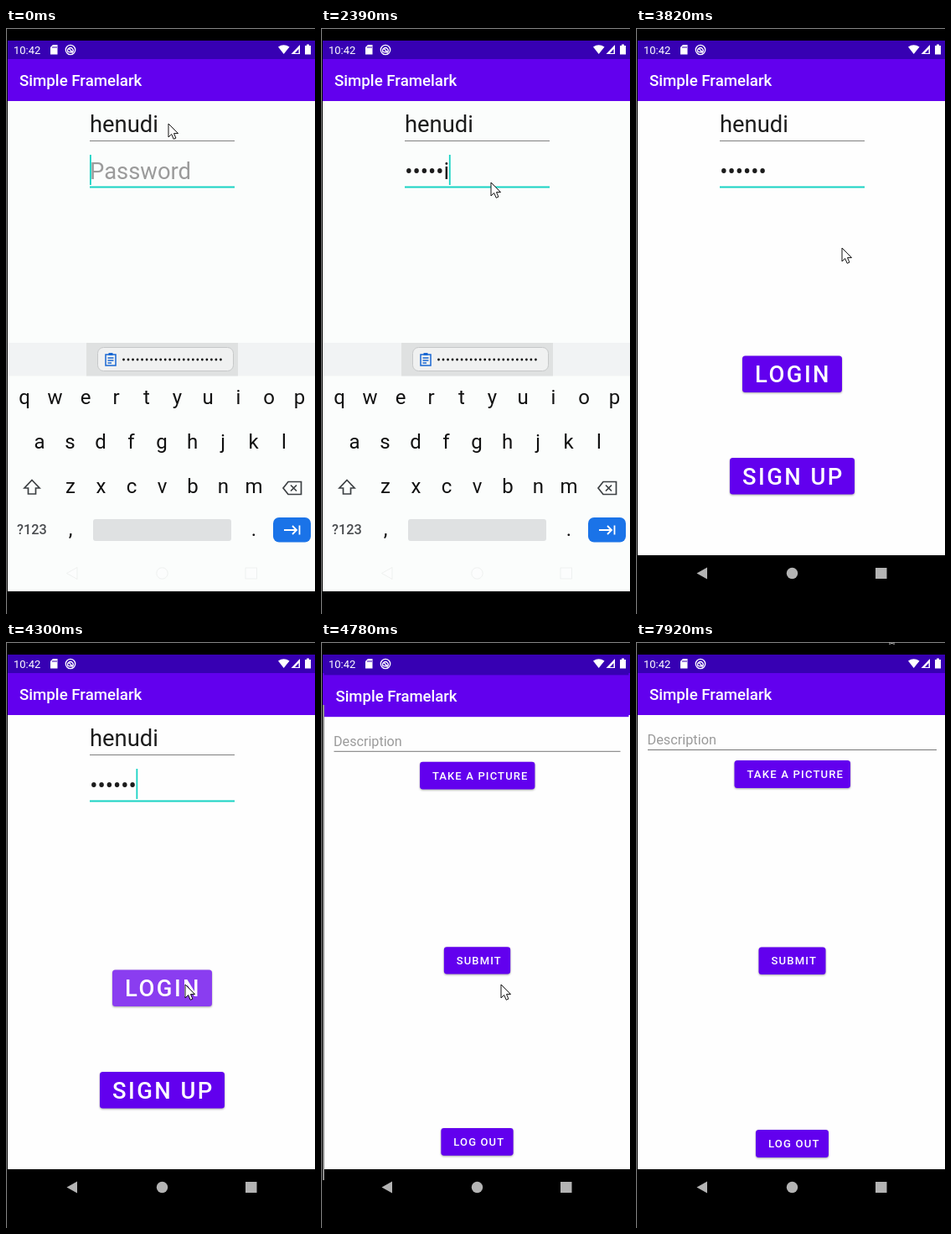
Recreate the animation shown at these times as an HTML page. Size 369x698 px, loop 8000 ms.

```html
<!DOCTYPE html>
<html lang="en">
<head>
<meta charset="utf-8">
<title>Sign in and post screen</title>
<style>
  html, body { margin: 0; width: 100%; height: 100%; overflow: hidden; background: #000; }
  svg { display: block; width: 369px; height: 698px; font-family: Roboto, sans-serif; }
  .title { font-size: 18.7px; font-weight: 500; fill: #fff; }
  .field { font-size: 27.4px; fill: #1c1c1c; }
  .hint { fill: #9b9b9b; }
  .label { font-weight: 500; fill: #fff; letter-spacing: .0893em; }
  .key { font-size: 24px; fill: #111; text-anchor: middle; }
  .line { fill: none; stroke: #3c4043; stroke-width: 1.7; }
  .button { fill: #6200ee; filter: drop-shadow(0 1px 1px rgba(0, 0, 0, .35)); }
</style>
</head>
<body>
<svg viewBox="0 0 369 698">
  <defs>
    <g id="bars">
      <rect x="2" y="15" width="367" height="22" fill="#3700b3"/>
      <rect x="2" y="37" width="367" height="50" fill="#6200ee"/>
      <text class="title" x="16" y="69">Simple Framelark</text>
    </g>
    <g id="navIcons">
      <path d="M72.500 649.500L85 642.500v14z"/>
      <circle cx="186.500" cy="649.500" r="6.700"/>
      <rect x="286" y="643" width="13.500" height="13"/>
    </g>
  </defs>

  <rect width="369" height="698"/>
  <path d="M0 .5H369M.5 0V698" stroke="#858585"/>

  <g id="login">
    <rect id="loginPage" x="2" y="87" width="367" height="541"/>
    <use href="#bars"/>
    <text class="field" x="100" y="124">henudi</text>
    <path d="M100 134.500h173" stroke="#808080"/>
    <text class="field hint" id="passwordHint" x="100" y="179.500">Password</text>
    <text class="field" id="password" x="100.300" y="179.500"></text>
    <path d="M100 189.500h173" stroke="#18d3c4" stroke-width="2"/>
    <rect id="caret" y="151" width="1.800" height="36" fill="#18d3c4"/>
    <g id="loginButtons"></g>
  </g>

  <use href="#navIcons" fill="#b4b4b4"/>

  <g id="keyboard">
    <rect x="2" y="414" width="367" height="257" fill="#fbfdfc"/>
    <rect x="2" y="375" width="367" height="39.500" fill="#f1f3f4"/>
    <rect x="96" y="375" width="181" height="39.500" fill="#dfe1e1"/>
    <rect x="109.500" y="380.500" width="162" height="28" rx="7" fill="#f0f1f1" stroke="#c6c8c9"/>
    <g fill="none" stroke="#1967d2" stroke-width="1.500">
      <path d="M119 389h12v13h-12zM121.500 393h7M121.500 396h7M121.500 399h4.500"/>
      <path d="M122.500 388.500h5" stroke-width="3"/>
    </g>
    <path d="M140.500 395H257" stroke="#111" stroke-width="2.800" stroke-linecap="round" stroke-dasharray="0 5.520"/>
    <use href="#navIcons" fill="#fcfdfd" stroke="#e9ebea" stroke-width=".7"/>
    <g id="keys">
      <path class="line" d="M31 538.500l9 9.500h-4.500v7h-9v-7H22z"/>
      <path class="line" d="M337 540.500h15.500v15H337l-6-7.500zM340 544.500l7 7M347 544.500l-7 7"/>
      <text x="13" y="603" font-size="16.300" font-weight="500" fill="#4a4d50">?123</text>
      <text class="key" x="77" y="605">,</text>
      <rect x="104" y="585" width="165" height="26" rx="3" fill="#dfe1e2"/>
      <text class="key" x="296" y="605">.</text>
      <rect x="319" y="583" width="45" height="29.500" rx="7" fill="#1a73e8"/>
      <path d="M332 598h14.500M342 593l5 5-5 5M350.500 592.500v11" fill="none" stroke="#fff" stroke-width="1.800"/>
    </g>
  </g>

  <g id="post">
    <rect x="2" y="87" width="367" height="541" fill="#fefefe"/>
    <use href="#bars"/>
    <text class="hint" x="13.500" y="122" font-size="16.300">Description</text>
    <path d="M14 128.500h345" stroke="#777"/>
    <g id="postButtons"></g>
  </g>
  <path id="edge" d="M3 75V641" stroke="#8c8c8c" stroke-width="2"/>

  <g fill="#fff">
    <text x="9" y="31" font-size="13">10:42</text>
    <path d="M56 20h5.500v11.500H53V23z"/>
    <path d="M56 22v2M58 22v2M60 22v2" stroke="#3700b3"/>
    <g fill="none" stroke="#fff" stroke-width="1.300">
      <circle cx="77" cy="26" r="5.700"/>
      <path d="M74 28.500a3.300 3.300 0 1 1 5.500 .5zM75.500 25l4 4"/>
    </g>
    <path d="M325 22.500q6.500-4.500 13.500 0L331.700 31z"/>
    <path d="M340.500 31L351 20v11z"/>
    <path d="M345 30l4.500-5v5z" fill="#3700b3"/>
    <path d="M357 21h2v-1.500h3V21h2v10.500h-7z"/>
  </g>

  <path id="arrow" d="M0 0V16l3.700-3.500 2.500 5.800 2.700-1.200-2.400-5.500h5z" fill="#fff" stroke="#111"/>
  <g id="beam" fill="none">
    <path d="M-3.500 .8Q0 .8 0 3V13Q0 15.200-3.500 15.200M3.500 .8Q0 .8 0 3V13Q0 15.200 3.500 15.200" stroke="#ddd" stroke-width="2"/>
    <path d="M-3.500 .8Q0 .8 0 3V13Q0 15.200-3.500 15.200M3.500 .8Q0 .8 0 3V13Q0 15.200 3.500 15.200" stroke="#111" stroke-width=".8"/>
  </g>
</svg>

<script>
const DURATION = 8000;
const $ = id => document.getElementById(id);

function add(parent, tag, attributes, text = '') {
  const node = document.createElementNS('http://www.w3.org/2000/svg', tag);
  for (const name in attributes) node.setAttribute(name, attributes[name]);
  node.textContent = text;
  parent.append(node);
  return node;
}

function addButton(parent, label, x, y, width, height, fontSize) {
  const box = add(parent, 'rect', { class: 'button', x, y, width, height, rx: 3.5 });
  const baseline = y + height / 2 + fontSize * 0.356;
  add(parent, 'text', { class: 'label', x: x + 15, y: baseline, 'font-size': fontSize }, label);
  return box;
}

const loginButton = addButton($('loginButtons'), 'LOGIN', 127, 390.5, 119, 43.5, 27.4);
addButton($('loginButtons'), 'SIGN UP', 112, 512, 149, 43.5, 27.4);
addButton($('postButtons'), 'TAKE A PICTURE', 117.5, 141, 138.5, 33, 13.1);
addButton($('postButtons'), 'SUBMIT', 146.5, 363.5, 80, 32.5, 13.1);
addButton($('postButtons'), 'LOG OUT', 143, 581, 87, 33, 13.1);

[['qwertyuiop', 22, 448], ['asdfghjkl', 40, 500.5], ['zxcvbnm', 77, 553.5]].forEach(([row, x, y]) =>
  [...row].forEach((letter, i) => add($('keys'), 'text', { class: 'key', x: x + i * 36.5, y }, letter)));

// Each step is [start time, value...] and holds until the next one.
const passwordSteps = [[0, ''], [250, 'h'], [650, '•e'], [890, '••n'], [1030, '•••u'],
  [1150, '••••d'], [1270, '•••••i'], [2760, '••••••']];
const caretToggles = [1780, 2270, 2760, 3280, 3820, 4300];
const pressSteps = [[0, '#6200ee'], [4180, '#7622ee'], [4300, '#8a3df0'], [4540, '#7622ee']];
const openSteps = [[0, 1, 0], [4660, 0.95, 0.75], [4780, 0.9915, 1], [4900, 0.998, 1], [5020, 1, 1]];
const pointerSteps = [
  [0, 194, 114], [2030, 196, 128], [2150, 199, 150], [2270, 202, 174], [2390, 203, 184],
  [2640, 207, 194], [2760, 210, 199], [3030, 207, 199], [3670, 214, 212], [3820, 246, 262],
  [3940, 268, 330], [4060, 244, 388], [4180, 214, 408], [4660, 215, 408], [5650, 219, 408],
  [5790, 206, 345], [5910, 200, 210], [6030, 232, 80], [6150, 263.5, 6, 'beam'],
  [6270, 325, 10, 'beam'], [6390, 357, 26], [6510, 337, 37], [6630, 340.5, 40, 'beam'],
  [7020, 339.5, 40, 'beam'], [7920, 305.5, -13.5, 'beam']
];

const at = (steps, t) => steps.findLast(step => t >= step[0]).slice(1);
const show = (id, visible) => $(id).setAttribute('visibility', visible ? 'visible' : 'hidden');

function draw(t) {
  const [typed] = at(passwordSteps, t);
  $('password').textContent = typed;
  show('passwordHint', !typed);
  const caretX = 100 + (typed ? $('password').getComputedTextLength() : 0);
  $('caret').setAttribute('x', caretX);
  show('caret', caretToggles.filter(time => t >= time).length % 2 === 0);

  loginButton.style.fill = at(pressSteps, t)[0];
  $('loginPage').setAttribute('fill', t < 3670 ? '#fbfdfc' : '#fefefe');

  const hiding = t >= 3530;
  show('keyboard', t < 3670);
  $('keyboard').setAttribute('opacity', hiding ? 0.955 : 1);
  $('keys').setAttribute('transform', `translate(0 ${hiding ? 1.3 : 0})`);

  const [scale, opacity] = at(openSteps, t);
  show('post', opacity > 0);
  $('post').setAttribute('opacity', opacity);
  $('post').setAttribute('transform', `translate(186 343) scale(${scale}) translate(-186 -343)`);
  show('edge', t >= 4780 && t < 4900);

  const [x, y, shape = 'arrow'] = at(pointerSteps, t);
  for (const id of ['arrow', 'beam']) show(id, id === shape);
  $(shape).setAttribute('transform', `translate(${x} ${y})`);
}

function tick() {
  draw(performance.now() % DURATION);
  requestAnimationFrame(tick);
}
tick();
</script>
</body>
</html>
```
